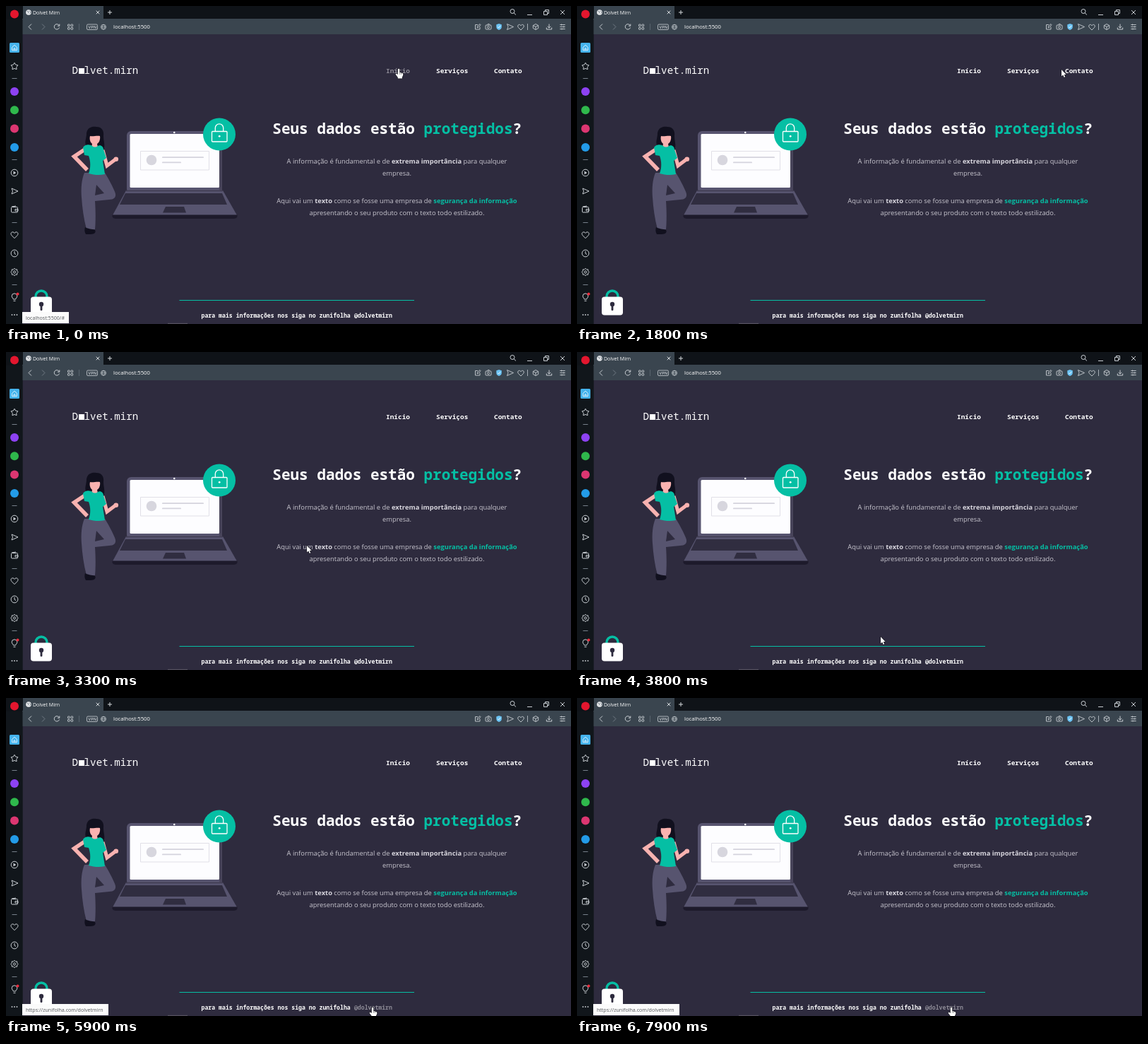
Write an HTML page with a canvas that moves like this. It is 800 px wide and 450 px high and loops after 8 s.

```html
<!DOCTYPE html>
<html lang="pt-BR">
<head>
<meta charset="utf-8">
<title>Dolvet Mirn</title>
<style>
html, body { margin: 0; width: 100%; height: 100%; overflow: hidden; background: #2e2b3e; }
canvas { display: block; width: 800px; height: 450px; }
</style>
</head>
<body>
<canvas id="stage" width="800" height="450"></canvas>
<script>
const ctx = document.getElementById('stage').getContext('2d');
const LOOP = 8000, STEP = 100;
const MONO = '"Noto Sans Mono", "DejaVu Sans Mono", monospace';
const SANS = '"Open Sans", "Noto Sans", sans-serif';
const BG = '#2e2b3e', TEAL = '#05bfa4', INK = '#11101e', GREY = '#57546f';
const SKIN = '#f9b2b0', ICON = '#c9ced3', DIM = '#717b85', WHITE = '#fff';

function rect(x, y, w, h, color, r = 0) {
  ctx.fillStyle = color;
  ctx.beginPath();
  ctx.roundRect(x, y, w, h, r);
  ctx.fill();
}

function box(x, y, w, h, color, r = 0, lw = 1) {
  ctx.strokeStyle = color;
  ctx.lineWidth = lw;
  ctx.beginPath();
  ctx.roundRect(x, y, w, h, r);
  ctx.stroke();
}

function disc(x, y, r, color) {
  ctx.fillStyle = color;
  ctx.beginPath();
  ctx.arc(x, y, r, 0, 7);
  ctx.fill();
}

function ring(x, y, r, color = ICON, lw = 1) {
  ctx.strokeStyle = color;
  ctx.lineWidth = lw;
  ctx.beginPath();
  ctx.arc(x, y, r, 0, 7);
  ctx.stroke();
}

function fill(d, color) {
  ctx.fillStyle = color;
  ctx.fill(new Path2D(d));
}

function line(d, color = ICON, lw = 1) {
  ctx.strokeStyle = color;
  ctx.lineWidth = lw;
  ctx.stroke(new Path2D(d));
}

// Draws a path around a local origin.
function icon(x, y, d, color = ICON, lw = 1) {
  ctx.save();
  ctx.translate(x, y);
  line(d, color, lw);
  ctx.restore();
}

// Closed outline whose radius alternates between outer and inner.
function spikes(x, y, count, outer, inner) {
  ctx.beginPath();
  for (let i = 0; i < count * 2; i++) {
    const r = i % 2 ? inner : outer, a = i * Math.PI / count - Math.PI / 2;
    ctx.lineTo(x + r * Math.cos(a), y + r * Math.sin(a));
  }
  ctx.closePath();
  ctx.strokeStyle = ICON;
  ctx.lineWidth = 1;
  ctx.stroke();
}

function text(str, x, y, size, family, color, weight = 400) {
  ctx.font = `${weight} ${size}px ${family}`;
  ctx.fillStyle = color;
  ctx.fillText(str, x, y);
  return ctx.measureText(str).width;
}

// Centred line made of [text, weight, color] runs.
function runs(center, y, size, family, parts) {
  let width = 0;
  for (const [str, weight] of parts) {
    ctx.font = `${weight} ${size}px ${family}`;
    width += ctx.measureText(str).width;
  }
  let x = center - width / 2;
  for (const [str, weight, color] of parts) x += text(str, x, y, size, family, color, weight);
}

const HEART = 'M0 4L-3.6 .4C-6-3-1.6-5.4 0-2.2C1.6-5.4 6-3 3.6 .4Z';
const SEND = 'M-4-4L5 0L-4 4L-2.5 0Z';
const GLOBE = 'M-3.5 0H3.5M0-3.5C-2.4-1-2.4 1 0 3.5C2.4 1 2.4-1 0-3.5';
const CROSS = 'M-3-3L3 3M3-3L-3 3';

function topBar() {
  rect(0, 0, 800, 19, '#0f1318');
  rect(24, 0, 114, 19, '#3a454f');
  rect(23, 18, 777, 22, '#3a454f');
  disc(32, 9, 3.8, '#eef0f2');
  line('M29.5 7L32 8L31 10.5M33 6.5L35 9L33.5 11', '#6c7680', .9);
  text('Dolvet Mirn', 38, 11.7, 7, SANS, WHITE);
  icon(130, 9, 'M-2.3-2.3L2.3 2.3M2.3-2.3L-2.3 2.3', '#d5d9dc');
  icon(147, 9, 'M-3 0H3M0-3V3', '#d5d9dc');
  ring(717, 7.5, 3);
  line('M719 9.7L722 12.5');
  line('M738 12.5H745');
  box(761.5, 7.5, 5, 5, ICON);
  line('M763.5 7V5.5H768.5V10.5H767');
  icon(788, 9, CROSS);

  icon(34, 29.5, 'M2-4L-2 0L2 4');
  icon(53, 29.5, 'M-2-4L2 0L-2 4', DIM);
  icon(72, 29.5, 'M3.3-1.8A3.7 3.7 0 1 0 3.5 1M3.8-4V-1.3H1');
  for (const [x, y] of [[87.5, 26], [92, 26], [87.5, 30.5], [92, 30.5]]) box(x, y, 2.7, 2.7, ICON, .5, .9);
  line('M103.5 25V34', '#59636d');
  box(114.5, 26, 15, 7.5, ICON, 1.5, .8);
  text('VPN', 116.6, 32, 5.7, SANS, ICON, 600);
  ring(138, 29.7, 3.5, ICON, .8);
  icon(138, 29.7, GLOBE, ICON, .7);
  text('localhost:5500', 152, 32.3, 7.7, SANS, WHITE);

  icon(668, 29.5, 'M0-3H-3.5V3.5H3V0M-1 1L-.5-1L3-4L4-2.8L.6 .8Z', ICON, .9);
  box(679, 27, 8, 6, ICON, 1, .9);
  line('M681.5 26.5L682.3 25.5H684.2L685 26.5', ICON, .9);
  ring(683, 30, 1.5, ICON, .8);
  fill('M694.3 26.3L698 25L701.8 26.3V29.5C701.8 32 700 33.3 698 34C696 33.3 694.3 32 694.3 29.5Z', '#6cc4f5');
  line('M696.2 29.5L697.6 31L700 28', '#fff', .9);
  icon(713.5, 29.5, SEND, ICON, .9);
  icon(729, 30, HEART, ICON, .9);
  line('M738.5 25V34', '#a5adb4');
  icon(750, 29.5, 'M0-4L3.7-2V2L0 4L-3.7 2V-2ZM-3.7-2L0 0L3.7-2M0 0V4', ICON, .9);
  icon(769, 29.5, 'M0-4V1.5M-2.3-.7L0 1.6L2.3-.7M-3.7 1V3.5H3.7V1');
  icon(788, 29.5, 'M-3.7-3H3.7M-3.7 0H3.7M-3.7 3H3.7M-1.5-4V-2M1.7-1V1M-1 2V4', ICON, .9);
}

function sideBar() {
  rect(0, 19, 23.5, 431, '#11161b');
  disc(12, 11.5, 6, '#e3162e');
  rect(5, 52, 14, 14, '#45b3ec', 1.5);
  icon(12, 59, 'M-3.5-.5L0-3.8L3.5-.5V3.7H-3.5ZM-1 3.5V1H1V3.5', '#e4f5ff', .9);
  spikes(12, 85.5, 5, 5.2, 2.9);

  for (const y of [102.5, 217.5, 306.5, 394.5]) line(`M8.5 ${y}H15.5`, '#77808a');
  ['#8d42f2', '#2fb84c', '#dc3671', '#239be8'].forEach((c, i) => disc(12, 121 + i * 26.3, 6, c));

  ring(12, 236, 4.8);
  fill('M10.5 233.5L14.3 236L10.5 238.5Z', ICON);
  icon(12, 262, SEND);
  box(7.5, 284.5, 9, 7.5, ICON, 1);
  line('M8 284L14 283M13 287.5H17V290H13Z');
  icon(12, 324, 'M0 4.7L-4.2 .4C-7-3.3-1.8-6 0-2.5C1.8-6 7-3.3 4.2 .4Z');
  ring(12, 350, 4.9);
  line('M12 347V350.3L14 351.5');
  ring(12, 376.5, 1.6);
  spikes(12, 376.5, 8, 5.2, 4);
  icon(12, 412, 'M-1.6 3C-1.6 1.5-3.8 .8-3.8-1.4A3.8 3.8 0 0 1 3.8-1.4C3.8 .8 1.6 1.5 1.6 3ZM-1.5 5.3H1.5');
  disc(16.5, 407.5, 2, '#ef2b3d');
  for (const x of [8.5, 12, 15.5]) disc(x, 437, .9, ICON);
}

function woman() {
  // hair behind the face
  fill('M114 180C115 172 122 170 128 171C136 171 139 177 138 184C138 191 141 198 138 204C131 208 118 204 113 197C111 192 114 187 114 180Z', INK);
  // far arm
  line('M137 204L143 226L155 217', SKIN, 5);
  disc(155.8, 216.8, 3.3, SKIN);
  // face and neck
  fill('M119 184C123 185 129 183 133 184C134 190 131 194 129 195L130 200H121L122 195C119 193 118 188 119 184Z', SKIN);
  // near arm
  line('M113 202L96.5 213L115 232', SKIN, 5.5);
  // trousers
  fill('M111 236L140 236C145 244 151 255 154.5 264C157 271 152 274 146 274L126 276C127 291 127 305 126 316H114C110 301 108 286 107 271C106 257 107 246 111 236Z', GREY);
  fill('M128 253L139 265L126 268Z', BG);
  // shirt
  fill('M109 200C113 195 119 196 122 198C124 200 128 200 130 198C134 196 138 199 138 203L142 215L137 219C138 226 139 231 140 238C132 240 124 239 117 237C120 229 120 220 117 212L111 211Z', TEAL);
  // shoe
  fill('M112 313C117 316 121 315 126 317C128 320 125 323 120 323H113C111 320 111 316 112 313Z', INK);
}

function laptop() {
  rect(171, 177, 135, 88, GREY, 6);
  rect(302, 183, 4, 78, '#48445a', 2);
  rect(175.5, 181, 126.5, 76, '#fdfdff', 1.5);
  disc(238.3, 179, 1.3, '#fff');
  box(190.5, 205.5, 97, 26.5, '#dedde5', 0, .9);
  disc(206, 218, 7.3, '#d7d6de');
  rect(221, 213.3, 59, 1.8, '#d5d4dd', 1);
  rect(221, 220.5, 27, 1.8, '#d5d4dd', 1);

  fill('M170 261H307L327 296H151Z', GREY);
  line('M170 261.5H307', '#403c52', 1.5);
  fill('M169 265H306L313 281H161Z', '#302d40');
  fill('M226 284H252L255 292.5H222Z', '#302d40');
  fill('M150.5 295.5H327.5V298C327 300 325 301 322 301H156C153 301 151 300 150.5 298Z', '#1d1a2b');

  disc(302, 181.5, 23, TEAL);
  box(291.5, 177.5, 21.5, 14.5, '#fff', 1, 1.3);
  line('M296.3 177.5V172.5A5.7 5.7 0 0 1 307.7 172.5V177.5', '#fff', 1.3);
  disc(302.2, 184.3, 1.4, '#fff');
}

function padlock() {
  line('M42 413V411A8 8 0 0 1 58 411V413', TEAL, 3.5);
  rect(35, 411.5, 30, 26, '#fff', 4);
  disc(50, 422, 3.2, BG);
  rect(48.6, 422, 2.8, 9, BG, 1);
}

const links = [
  { str: 'Início', x: 538, y: 94.5, w: 34, size: 9.45 },
  { str: 'Serviços', x: 609, y: 94.5, w: 45, size: 9.45 },
  { str: 'Contato', x: 691, y: 94.5, w: 40, size: 9.45 },
  { str: '@dolvetmirn', x: 492.9, y: 441.3, w: 54, size: 8.2 }
];

function page(hovered) {
  rect(23.5, 40, 776.5, 410, BG);
  text('D', 93.5, 96, 14.2, MONO, WHITE, 500);
  rect(103, 88, 8, 8, WHITE);
  text('lvet.mirn', 110.6, 96, 14.2, MONO, WHITE, 500);

  woman();
  laptop();

  runs(553.7, 181, 21, MONO, [['Seus dados estão ', 700, WHITE], ['protegidos', 700, TEAL], ['?', 700, WHITE]]);
  const soft = '#c8c6cf', strong = '#d8d6de';
  const body = (y, parts) => runs(553.5, y, 9.4, SANS, parts);
  body(222.5, [['A informação é fundamental e de ', 400, soft], ['extrema importância', 700, strong], [' para qualquer', 400, soft]]);
  body(239.5, [['empresa.', 400, soft]]);
  body(279, [['Aqui vai um ', 400, soft], ['texto', 700, strong], [' como se fosse uma empresa de ', 400, soft], ['segurança da informação', 700, TEAL]]);
  body(295.5, [['apresentando o seu produto com o texto todo estilizado.', 400, soft]]);

  rect(245.5, 416, 332.5, 1, TEAL);
  text('para mais informações nos siga no zunifolha ', 276.5, 441.3, 8.2, MONO, WHITE, 700);
  for (const l of links) text(l.str, l.x, l.y, l.size, MONO, l === hovered ? '#8d8b96' : WHITE, 700);
  padlock();
  rect(229, 448.8, 28, 1.2, '#55525f');
}

function status(t) {
  const social = t >= 5100;
  if (!social && t >= 1700) return;
  rect(23, 433, social ? 122 : 66, 16, '#fbfbfb');
  text(social ? 'https://zunifolha.com/dolvetmirn' : 'localhost:5500/#', 28, 443.7, 7.1, SANS, '#55585c');
}

// Pointer tip: time, x, y
const trail = [
  [0, 556, 89], [400, 556, 89], [900, 627, 89], [1100, 627, 89], [1400, 704, 90],
  [1600, 704, 90], [1800, 686, 90], [2000, 640, 84], [2600, 420, 75], [2900, 420, 75],
  [3600, 430, 403], [4600, 430, 403], [5200, 519, 438], [7400, 519, 438], [7900, 530, 438], [8000, 530, 438]
];

function pointer(t) {
  const i = Math.max(1, trail.findIndex(k => k[0] >= t));
  const [t0, x0, y0] = trail[i - 1], [t1, x1, y1] = trail[i];
  const p = (t - t0) / (t1 - t0), e = p * p * (3 - 2 * p);
  return [x0 + (x1 - x0) * e, y0 + (y1 - y0) * e];
}

const HAND = 'M-1.2 .8C-1-.7 1.2-.7 1.3 .8V5L3.5 5.4L6 6.5C6.8 8 6 10 5 11.5V13.5H-1.2V12L-4.3 8C-4.5 6.5-3 6.2-1.2 8Z';
const ARROW = 'M0 0V9.5L2.2 7.6L3.7 11L5.2 10.3L3.8 7H6.7Z';

function drawPointer(x, y, hand) {
  const shape = hand ? HAND : ARROW;
  ctx.save();
  ctx.translate(x, y);
  ctx.lineJoin = 'round';
  line(shape, '#15141d', 1.2);
  fill(shape, '#fff');
  if (hand) line('M1.3 5V8M3.5 5.6V8', '#555', .6);
  ctx.restore();
}

function draw(now) {
  const t = Math.floor((now % LOOP) / STEP) * STEP;
  const [x, y] = pointer(t);
  const hovered = links.find(l => x >= l.x && x <= l.x + l.w && Math.abs(y + 3 - l.y) < 8);
  page(hovered);
  topBar();
  sideBar();
  status(t);
  drawPointer(x, y, hovered);
  requestAnimationFrame(draw);
}
requestAnimationFrame(draw);
</script>
</body>
</html>
```
